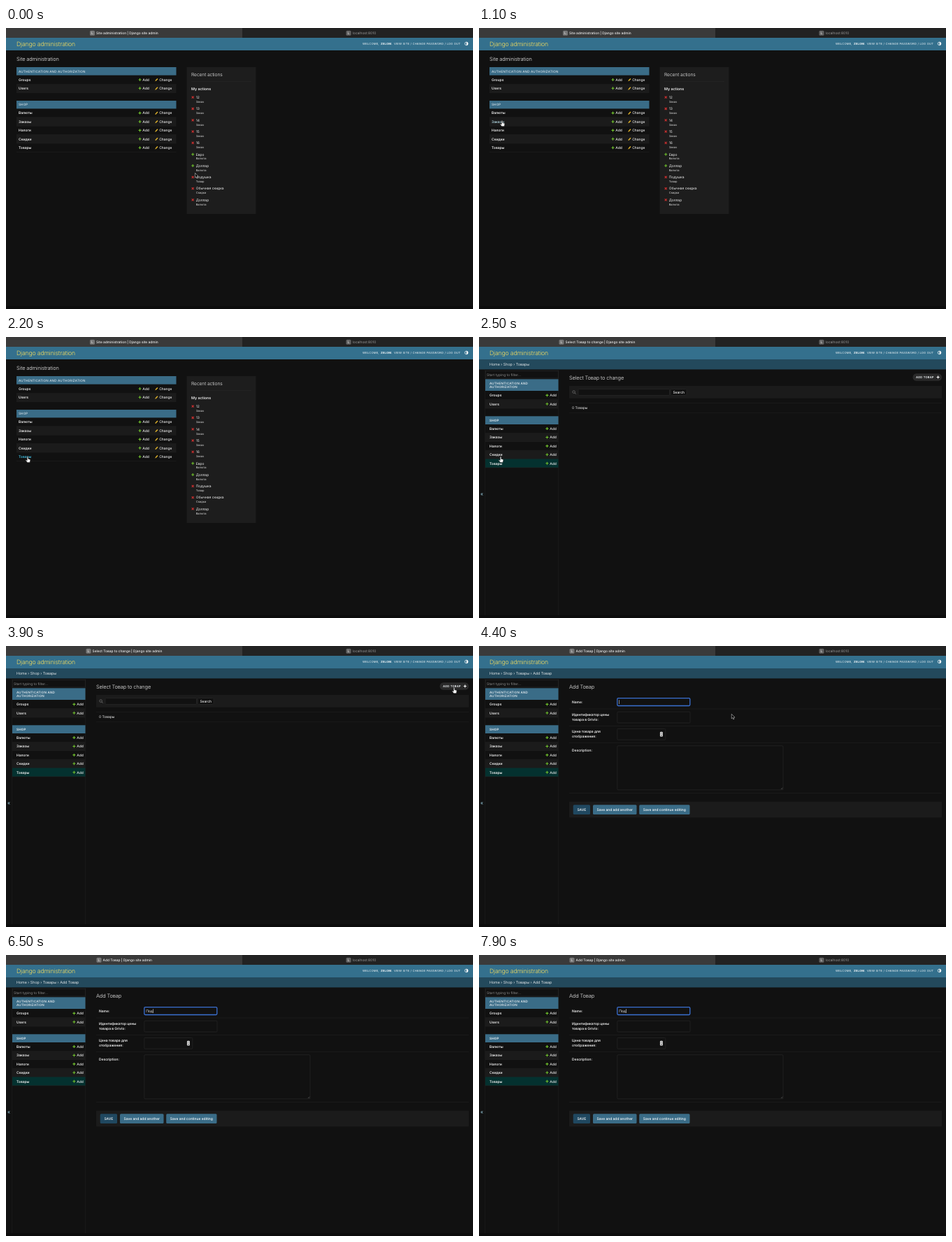
An HTML page that plays this animation: 668 px wide and 402 px high, repeating every 8000 ms.

```html
<!DOCTYPE html>
<html lang="en">
<head>
<meta charset="utf-8">
<title>Django administration</title>
<style>
  html, body { margin: 0; width: 100%; height: 100%; overflow: hidden; background: #111; }
  svg { display: block; width: 100vw; height: 100vh; }
  text { font-family: Inter, Roboto, sans-serif; text-rendering: geometricPrecision; white-space: pre; }
</style>
</head>
<body>
<svg id="stage" viewBox="0 0 668 402"></svg>
<script>
const LOOP = 8000, STEP = 100;
const LIST_AT = 2500, FORM_AT = 4200, POPUP_AT = 5300, TYPING_AT = 6200;
const BLUE = '#3a6c87', DEEP = '#23495c', GREEN = '#6fbf2c', PANEL = '#1b1b1b', LINE = '#232323';
const stage = document.getElementById('stage');

// y is the middle of the capital letters
function text(x, y, content, { size = 4.95, weight = 400, fill = '#eee', spacing = 0, anchor = 'start', id = '' } = {}) {
  return `<text id="${id}" x="${x}" y="${y + size * 0.364}" font-size="${size}" font-weight="${weight}"
    fill="${fill}" letter-spacing="${spacing}" text-anchor="${anchor}">${content}</text>`;
}
const bold = (x, y, content, fill) => text(x, y, content, { weight: 600, fill });
const heading = (x, y, content, size, fill = '#eee') =>
  text(x, y, content, { size, weight: 300, fill, spacing: -0.02 * size });
const caps = (x, y, content, size = 4.56, weight = 400) =>
  text(x, y, content, { size, weight, spacing: 0.19, fill: '#f2f6f8' });

// edges rather than sizes, as the layout is a set of columns and lines
function box(left, top, right, bottom, fill, { radius = 0, stroke = 'none', width = 0.6 } = {}) {
  return `<rect x="${left}" y="${top}" width="${right - left}" height="${bottom - top}" rx="${radius}"
    fill="${fill}" stroke="${stroke}" stroke-width="${width}"/>`;
}
const field = (left, top, right, bottom) => box(left, top, right, bottom, '#111', { radius: 1.3, stroke: '#2c2c2c' });
const hairline = (left, right, y, color = LINE) => box(left, y - 0.25, right, y + 0.25, color);
const stroke = (d, color, width, extra = '') =>
  `<path d="${d}" fill="none" stroke="${color}" stroke-width="${width}" ${extra}/>`;
const plus = (x, y, color = GREEN) => stroke(`M${x - 2} ${y}h4M${x} ${y - 2}v4`, color, 1.1);
const cross = (x, y) => stroke(`M${x - 1.5} ${y - 1.5}l3 3m0-3l-3 3`, '#c9302f', 1.2);
const pencil = (x, y) => stroke(`M${x - 1.5} ${y + 1.6}l3-3.2`, '#e3b52c', 1.4)
  + stroke(`M${x - 2.1} ${y + 2.2}l.6-.6`, '#e3b52c', 0.7);

const MODELS = ['Валюты', 'Заказы', 'Налоги', 'Скидки', 'Товары'];
const modelY = (i, first) => first + i * 12.4;

function tabBar(title, x) {
  const icon = (left, fill) => box(left, 3.8, left + 7, 10.8, fill, { radius: 1.5 })
    + text(left + 3.5, 7.3, 'L', { size: 5, weight: 500, fill: '#ddd', anchor: 'middle' });
  return box(0, 0, 338, 14, '#3a3a3a') + box(338, 0, 668, 14, '#222')
    + icon(x - 9, '#777') + text(x, 7.4, title, { size: 4.85, weight: 500, fill: '#f0f0f0' })
    + icon(486.5, '#626262') + text(495.5, 7.4, 'localhost:8010', { fill: '#9a9a9a' });
}

function header() {
  return box(0, 14, 668, 32, '#34708d')
    + heading(15, 23, 'Django administration', 8.7, '#f5dd5d')
    + caps(510, 22.4, 'WELCOME,', 4.1) + caps(536, 22.4, 'ZELOM.', 4.1, 700)
    + caps(555, 22.4, 'VIEW SITE / CHANGE PASSWORD / LOG OUT', 4.1)
    + '<circle cx="658.6" cy="22.4" r="2.3" fill="none" stroke="#fff" stroke-width=".7"/>'
    + '<path d="M658.6 20.1a2.3 2.3 0 0 1 0 4.6z" fill="#fff"/>';
}

function dashboard(time) {
  const row = (name, y, striped, fill) =>
    (striped ? box(15, y - 6.2, 243.5, y + 6.2, PANEL) : '') + hairline(15, 243.5, y + 6.2)
    + bold(18, y, name, fill) + plus(191.5, y) + text(195.3, y, 'Add', { weight: 500 })
    + pencil(215.4, y) + text(219.2, y, 'Change', { weight: 500 });
  const linkColor = i => hoveredModel(time) !== i ? '#eee'
    : hoveredModel(time - STEP) === i ? '#3fbde0' : '#b0d6e0';
  const log = [...['12', '13', '14', '15', '16'].map(n => [n, 'Заказ', cross]),
    ['Евро', 'Валюта', plus], ['Доллар', 'Валюта', plus], ['Подушка', 'Товар', cross],
    ['Обычная скидка', 'Скидка', cross], ['Доллар', 'Валюта', cross]];

  return tabBar('Site administration | Django site admin', 129) + header()
    + heading(15, 44, 'Site administration', 7.45)
    + box(15, 56, 243.5, 67.6, BLUE) + caps(18, 62, 'AUTHENTICATION AND AUTHORIZATION')
    + row('Groups', 74, false) + row('Users', 86.3, true)
    + box(15, 104, 243.5, 115.4, BLUE) + caps(18, 109.8, 'SHOP')
    + MODELS.map((name, i) => row(name, modelY(i, 121.6), i % 2, linkColor(i))).join('')
    + box(258.5, 56, 357.5, 266, '#1d1d1d')
    + heading(265, 66.7, 'Recent actions', 6.8) + hairline(265, 351, 76.3, '#292929')
    + text(265, 86.7, 'My actions', { size: 5.3, weight: 600 })
    + log.map(([name, kind, icon], i) => {
      const y = 99.2 + i * 16.3;
      return icon(267.2, y) + text(271.7, y, name) + text(271.7, y + 6.3, kind, { size: 4.05, fill: '#dcdcdc' });
    }).join('');
}

function innerPage(title, tabX, crumbs) {
  const row = (name, y, fill) => (fill ? box(9, y - 6.2, 113.5, y + 6.2, fill) : '')
    + hairline(9, 113.5, y + 6.2) + bold(15, y, name) + plus(97.4, y) + text(101.3, y, 'Add', { weight: 500 });
  return tabBar(title + ' | Django site admin', tabX) + header()
    + box(0, 32, 668, 46.4, DEEP) + text(15, 39.3, crumbs, { size: 5.3, fill: '#e4e8ea' })
    + box(8.6, 46.4, 9.1, 398, LINE) + box(113.6, 46.4, 114.1, 398, LINE)
    + text(4, 224.4, '«', { size: 7, fill: '#9fd3e6', anchor: 'middle' })
    + box(9.3, 48.6, 113.4, 59, '#111', { stroke: '#2c2c2c' })
    + text(11, 53.8, 'Start typing to filter…', { fill: '#8c8c8c' })
    + box(9, 60.3, 113.5, 77, BLUE) + caps(15, 66.3, 'AUTHENTICATION AND', 4.56, 500)
    + caps(15, 71.6, 'AUTHORIZATION', 4.56, 500)
    + row('Groups', 83.4) + row('Users', 95.8, PANEL)
    + box(9, 113.3, 113.5, 125, BLUE) + caps(15, 119.3, 'SHOP', 4.56, 600)
    + MODELS.map((name, i) => row(name, modelY(i, 131.1), ['', PANEL, '', PANEL, '#04312f'][i])).join('');
}

function listPage() {
  return innerPage('Select Товар to change', 123.5, 'Home › Shop › Товары')
    + heading(129, 58.4, 'Select Товар to change', 7.45)
    + box(620.5, 52.2, 662, 62.8, '#2a2a2a', { radius: 5.3 })
    + caps(625, 57.5, 'ADD ТОВАР', 4.1, 600) + plus(656.6, 57.5, '#fff')
    + box(129, 70, 662, 87.6, PANEL)
    + '<circle cx="135.6" cy="78.6" r="1.8" fill="none" stroke="#777" stroke-width=".7"/>'
    + stroke('M137 80l1.6 1.6', '#777', 0.8)
    + field(142, 74.6, 272.5, 83.5) + field(274.2, 74.6, 297, 83.5) + text(277.4, 79, 'Search', { weight: 500 })
    + hairline(129, 662, 94.3) + text(133, 101.5, '0 Товары') + hairline(129, 662, 108.8);
}

function formPage(time) {
  const button = (left, right, label, fill) => box(left, 227.3, right, 241, fill, { radius: 1.5 })
    + text((left + right) / 2, 234.1, label, { weight: 500, anchor: 'middle', fill: '#fff' });
  const caretOn = time < 4800 || (time >= 5400 && time < 5900) || time >= TYPING_AT;
  return innerPage('Add Товар', 138.5, 'Home › Shop › Товары › Add Товар')
    + heading(129, 58.4, 'Add Товар', 7.45)
    + bold(133, 80.4, 'Name:')
    + bold(133, 98.3, 'Идентификатор цены') + bold(133, 104.9, 'товара в Grivlo:')
    + bold(133, 122.6, 'Цена товара для') + bold(133, 129.2, 'отображения:')
    + bold(133, 148.8, 'Description:')
    + [90, 114.3, 138.4, 210.5].map(y => hairline(129, 662, y)).join('')
    + box(197.8, 74.7, 301.8, 85.5, '#111', { radius: 1.4, stroke: '#3a6fd0', width: 1.3 })
    + text(200.2, 80.2, typedName(time), { id: 'typed' })
    + (caretOn ? '<rect id="caret" x="200.4" y="77.2" width=".5" height="5.8" fill="#fff"/>' : '')
    + field(197.8, 94.2, 302, 110) + field(197.8, 118.4, 266.8, 134.2)
    + box(258.9, 122.8, 262.9, 129.6, '#ddd', { radius: 1.2 })
    + stroke('M259.9 125.4l1-1.1 1 1.1M259.9 127l1 1.1 1-1.1', '#222', 0.7)
    + field(197.8, 142.8, 435, 205.8) + stroke('M431.8 205l2.4-2.4M433.3 205l.9-.9', '#888', 0.4)
    + box(129, 222.6, 662, 245.4, PANEL)
    + button(134.7, 159, 'SAVE', '#204860')
    + button(163, 225.5, 'Save and add another', BLUE)
    + button(229.2, 301.5, 'Save and continue editing', BLUE)
    + (time >= POPUP_AT && time < TYPING_AT ? languagePopup() : '');
}

function languagePopup() {
  const option = (y, label, fill) => text(338, y, label, { size: 7.6, fill, anchor: 'middle' });
  return box(283.2, 139, 393.2, 210.4, '#212121', { radius: 12 })
    + box(292, 174.6, 384.6, 201.8, '#353535', { radius: 4 })
    + option(161, 'ABC', '#a8a8a8') + option(188.2, 'Russian', '#c9c9c9');
}

const TYPING = [[6200, 'По'], [6500, 'Под'], [6600, 'Поду'], [6700, 'Подуш'], [7700, 'Поду'], [7800, 'Под']];
const typedName = time => (TYPING.filter(([at]) => time >= at).pop() || [0, ''])[1];

// time, x, y of the pointer tip
const POINTER = [[0, 270.5, 207.5], [100, 1, 121], [200, 1, 121], [500, 20, 124], [800, 42, 129], [1000, 40, 131],
  [1100, 33, 132.3], [1500, 31, 145], [2000, 30, 163], [2200, 31, 171], [2500, 31, 171], [3000, 367, 90],
  [3100, 367, 90], [3300, 520, 90], [3600, 520, 90], [3900, 641, 59.3], [4100, 641, 59.3],
  [4500, 268, 110], [4600, 148.5, 102], [LOOP, 148.5, 102]];

function pointerAt(time) {
  const next = Math.max(1, POINTER.findIndex(([at]) => at > time));
  const [t0, x0, y0] = POINTER[next - 1], [t1, x1, y1] = POINTER[next];
  const part = Math.max(0, (time - t0) / (t1 - t0));
  return [x0 + (x1 - x0) * part, y0 + (y1 - y0) * part];
}

function hoveredModel(time) {
  const [x, y] = pointerAt(time);
  return x < 18 || x > 38 ? -1 : MODELS.findIndex((_, i) => Math.abs(y - modelY(i, 121.6)) <= 6.2);
}

function pointer(time) {
  if (time >= TYPING_AT) return '';
  const [x, y] = pointerAt(time);
  const hand = time < LIST_AT ? hoveredModel(time) >= 0
    : time === LIST_AT || (time < FORM_AT && x > 620);
  const shape = hand
    ? 'd="M-.8.6q.8-1.2 1.6 0v2.8l2.3.6q.9.4.7 1.5l-.7 2.9h-3.6l-2.4-3.1q.1-1.1 1.2-.4l.9.8z" fill="#fff" stroke="#111"'
    : 'd="M0 0v6.6l1.5-1.4 1 2.4 1.2-.5-1-2.3h2z" fill="#000" stroke="#eee"';
  return `<path transform="translate(${x} ${y})" ${shape} stroke-width=".5"/>`;
}

function render(time) {
  const page = time < LIST_AT ? dashboard(time) : time < FORM_AT ? listPage() : formPage(time);
  stage.innerHTML = box(0, 0, 668, 402, '#111') + page + box(0, 398, 668, 402, '#0c0c0c') + pointer(time);
  const caret = document.getElementById('caret');
  if (caret) caret.setAttribute('x', 200.4 + document.getElementById('typed').getComputedTextLength());
}

const start = performance.now();
let shown = -1;
function tick() {
  const time = Math.floor(((performance.now() - start) % LOOP) / STEP) * STEP;
  if (time !== shown) render(shown = time);
  requestAnimationFrame(tick);
}
tick();
</script>
</body>
</html>
```
